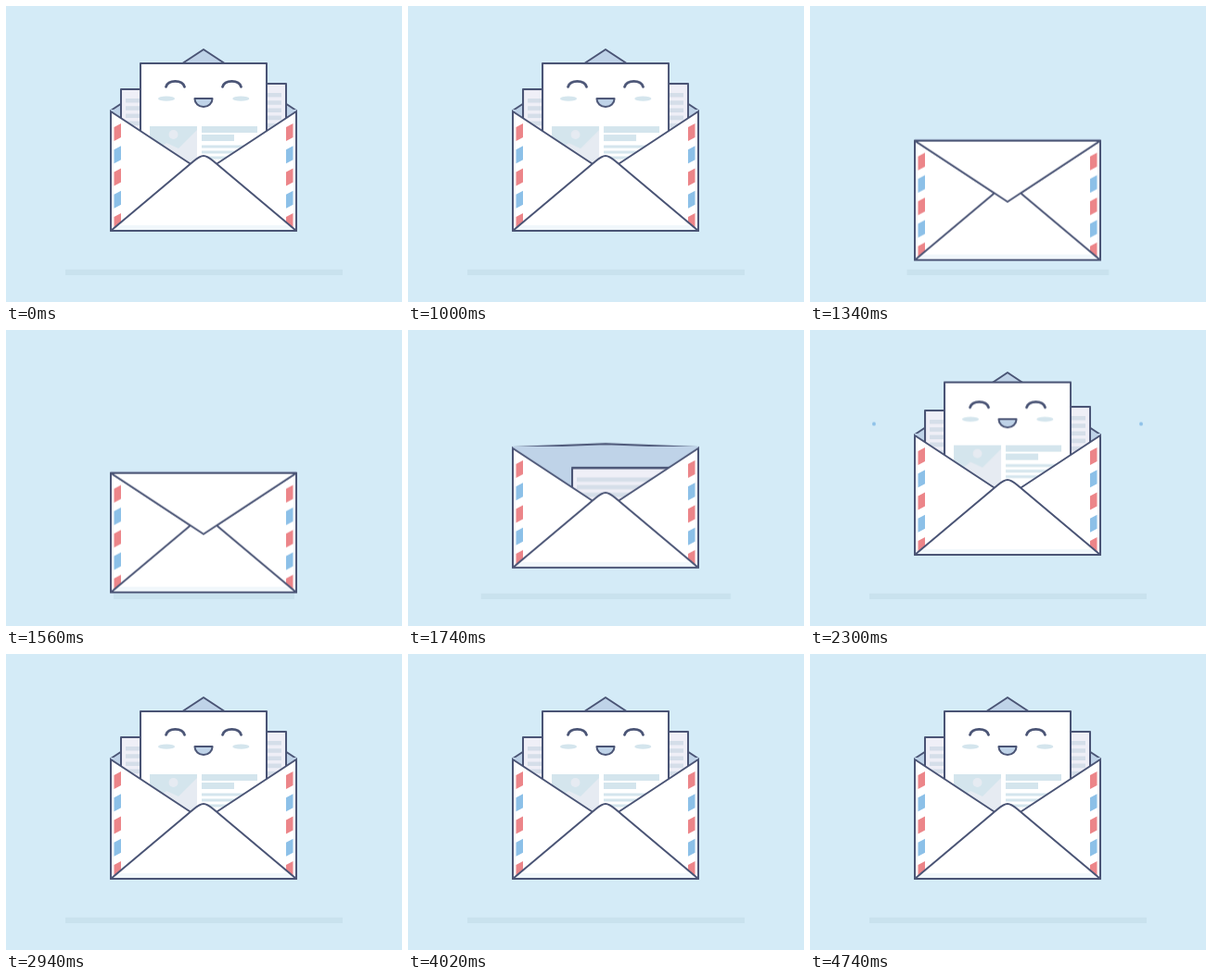
Animation, 427 px wide and 320 px high, one loop 4.8 s. Source, as an HTML page without scripts:

```html
<!DOCTYPE html>
<html lang="en">
<head>
<meta charset="utf-8">
<title>Happy letter</title>
<style>
html, body { margin: 0; height: 100%; overflow: hidden; background: #d4ebf7; }
svg { display: block; width: 100vw; height: 100vh; }

.line { stroke: #4a5475; stroke-width: 2; stroke-linejoin: round; stroke-linecap: round; }
.white { fill: #fff; }
.inside { fill: #bfd3e8; }
.back { fill: #efeff7; }
.bar { fill: #d5dee9; }
.ink { fill: #d4e5ed; }
.pale { fill: #e6ebf2; }
.red { fill: #ec8589; }
.blue { fill: #8cc0e8; }
.eye { fill: none; stroke-width: 2.8; }

.shadow, .env, .right, .left, .front, .face, .dot, .lid, .flap {
  animation: 4.8s linear infinite;
}
.shadow { fill: #c9e2ee; transform-origin: 213.5px 288px; animation-name: shadow; }
.env { animation-name: env; }
.right { animation-name: right; }
.left { animation-name: left; }
.front { animation-name: front; }
.face { animation-name: face; }
.dot { animation-name: dot; opacity: 0; }
.lid { animation-name: lid, lid-show; animation-timing-function: linear, step-end; }
.flap { animation-name: flap, flap-show; animation-timing-function: linear, step-end; }

/* envelope drop and rise */
@keyframes env {
  0%, 22.08% { transform: translateY(0); animation-timing-function: cubic-bezier(.37,0,.63,1); }
  31.04% { transform: translateY(43px); animation-timing-function: cubic-bezier(.45,0,.75,.6); }
  36.25% { transform: translateY(14px); animation-timing-function: cubic-bezier(.1,.48,.4,1); }
  43.75%, 100% { transform: translateY(0); }
}
@keyframes shadow {
  0%, 22.08% { transform: scaleX(1); animation-timing-function: cubic-bezier(.37,0,.63,1); }
  31.04% { transform: scaleX(.63); animation-timing-function: cubic-bezier(.45,0,.75,.6); }
  36.25% { transform: scaleX(.9); animation-timing-function: cubic-bezier(.1,.48,.4,1); }
  43.75%, 100% { transform: scaleX(1); }
}

/* sheets slide in, then pop out one after another */
@keyframes right {
  0%, 20.83% { transform: translateY(0); animation-timing-function: ease-in; }
  25%, 34% { transform: translateY(92px); animation-timing-function: ease-in; }
  36.25% { transform: translateY(52px); animation-timing-function: cubic-bezier(.2,.5,.4,1); }
  42% { transform: translateY(-5px); animation-timing-function: ease-in-out; }
  47.92% { transform: translateY(-1px); animation-timing-function: ease-out; }
  52%, 100% { transform: translateY(0); }
}
@keyframes left {
  0%, 20.83% { transform: translateY(0); animation-timing-function: ease-in; }
  25%, 36% { transform: translateY(92px); animation-timing-function: cubic-bezier(.3,.3,.4,1); }
  43.3% { transform: translateY(-7px); animation-timing-function: ease-in-out; }
  47.92% { transform: translateY(-3px); animation-timing-function: ease-out; }
  54%, 100% { transform: translateY(0); }
}
@keyframes front {
  0%, 20.83% { transform: translateY(0); animation-timing-function: ease-in; }
  25%, 37% { transform: translateY(115px); animation-timing-function: cubic-bezier(.3,.3,.4,1); }
  45% { transform: translateY(-9px); animation-timing-function: ease-in-out; }
  47.92% { transform: translateY(-5.5px); animation-timing-function: ease-out; }
  54%, 83.75% { transform: translateY(0); animation-timing-function: ease-in-out; }
  88% { transform: translateY(1.5px); animation-timing-function: ease-in-out; }
  94.58%, 100% { transform: translateY(0); }
}
@keyframes face {
  0%, 40% { transform: translateY(0); animation-timing-function: ease-in-out; }
  47.92% { transform: translateY(1.8px); animation-timing-function: ease-in-out; }
  54.2% { transform: translateY(-.6px); animation-timing-function: ease-out; }
  62.1%, 83.75% { transform: translateY(0); animation-timing-function: ease-in-out; }
  91% { transform: translateY(.6px); animation-timing-function: ease-out; }
  98.75%, 100% { transform: translateY(0); }
}

/* lid: flap seen from inside; flap: seen from outside */
@keyframes lid {
  0%, 23.4% { d: path("M113 113L213 47L313 113"); animation-timing-function: ease-in; }
  25.83%, 35.83% { d: path("M113 113L213 113L313 113"); animation-timing-function: cubic-bezier(.4,.2,.4,1); }
  41% { d: path("M113 113L213 46L313 113"); }
  47.92% { d: path("M113 113L213 46L313 113"); animation-timing-function: ease-out; }
  52%, 100% { d: path("M113 113L213 47L313 113"); }
}
@keyframes flap {
  0%, 25.83% { d: path("M113 114L313 114L213 114Z"); animation-timing-function: ease-out; }
  27.71%, 32.8% { d: path("M113 114L313 114L213 180Z"); animation-timing-function: ease-in; }
  35.83%, 100% { d: path("M113 114L313 114L213 114Z"); }
}
@keyframes lid-show {
  0% { visibility: visible; }
  25.83% { visibility: hidden; }
  35.83%, 100% { visibility: visible; }
}
@keyframes flap-show {
  0% { visibility: hidden; }
  25.83% { visibility: visible; }
  35.83%, 100% { visibility: hidden; }
}
@keyframes dot {
  0%, 39.4% { transform: translate(125px, 106px) scale(1.4); opacity: 0; }
  39.5% { transform: translate(125px, 106px) scale(1.4); opacity: 1; animation-timing-function: cubic-bezier(.1,.7,.3,1); }
  47.92% { transform: translate(69px, 101.5px) scale(1); opacity: 1; }
  50%, 100% { transform: translate(68px, 101.5px) scale(0); opacity: 0; }
}
</style>
</head>
<body>
<svg viewBox="0 0 427 320" preserveAspectRatio="none">
  <defs>
    <clipPath id="pocket"><path d="M60 0H367V240H60Z"/></clipPath>
    <path id="mark" d="M0 4L7.5 0V15L0 19Z"/>
    <g id="marks">
      <use href="#mark" class="red" y="127"/>
      <use href="#mark" class="blue" y="151.3"/>
      <use href="#mark" class="red" y="175.5"/>
      <use href="#mark" class="blue" y="199.7"/>
      <use href="#mark" class="red" y="224"/>
    </g>
    <g id="sheet">
      <path class="back line" d="M0 0H125V150H0Z"/>
      <path class="bar" d="M5 10h115v4.6H5zm0 8.2h115v4.6H5zm0 8.2h115v4.6H5zm0 8.2h115v4.6H5zm0 8.2h115v4.6H5z"/>
    </g>
    <path id="eye" class="eye line" d="M-10 87.3C-7.5 79.4 7.5 79.4 10 87.3"/>
  </defs>

  <path class="shadow" d="M64 284.7H363V291H64Z"/>

  <circle class="dot blue" r="2"/>
  <g transform="matrix(-1 0 0 1 426 0)"><circle class="dot blue" r="2"/></g>

  <g class="env">
    <path class="lid inside line" d="M113 113L213 47L313 113"/>
    <path class="inside" d="M113 112H313V116L213 182L113 116Z"/>

    <g clip-path="url(#pocket)">
      <g class="right"><use href="#sheet" x="177" y="84"/></g>
      <g class="left"><use href="#sheet" x="124" y="90"/></g>
      <g class="front">
        <path class="white line" d="M145 62H281V210H145Z"/>
        <path class="ink" d="M155 130H206V175H155Z"/>
        <path class="pale" d="M156 162L173 148L186 154L206 134V175H156Z"/>
        <circle class="pale" cx="180.5" cy="139" r="5"/>
        <path class="ink" d="M211 130h60v7h-60zm0 9h35v7h-35zm0 11.5h60v3h-60zm0 6h60v3h-60zm0 6h60v3h-60z"/>
        <g class="face">
          <ellipse class="ink" cx="173" cy="100.2" rx="9" ry="2.6"/>
          <ellipse class="ink" cx="253.3" cy="100.2" rx="9" ry="2.6"/>
          <use href="#eye" x="182.5"/>
          <use href="#eye" x="243.5"/>
          <path class="inside line" d="M203.5 100H222.5V100.5A9.5 8.5 0 0 1 203.5 100.5Z"/>
        </g>
      </g>
    </g>

    <path class="white line" d="M113 114L213 180L313 114V243H113Z"/>
    <use href="#marks" x="116.5"/>
    <use href="#marks" x="302"/>
    <path class="white" d="M113 243L202 168C211.5 160 214.5 160 224 168L313 243Z"/>
    <path fill="#f1f7fb" d="M120 237H306L313 243H113Z"/>
    <path class="line" fill="none" d="M113 243L202 168C211.5 160 214.5 160 224 168L313 243Z"/>
    <path class="flap white line" d="M113 114L313 114L213 114Z"/>
  </g>
</svg>
</body>
</html>
```
